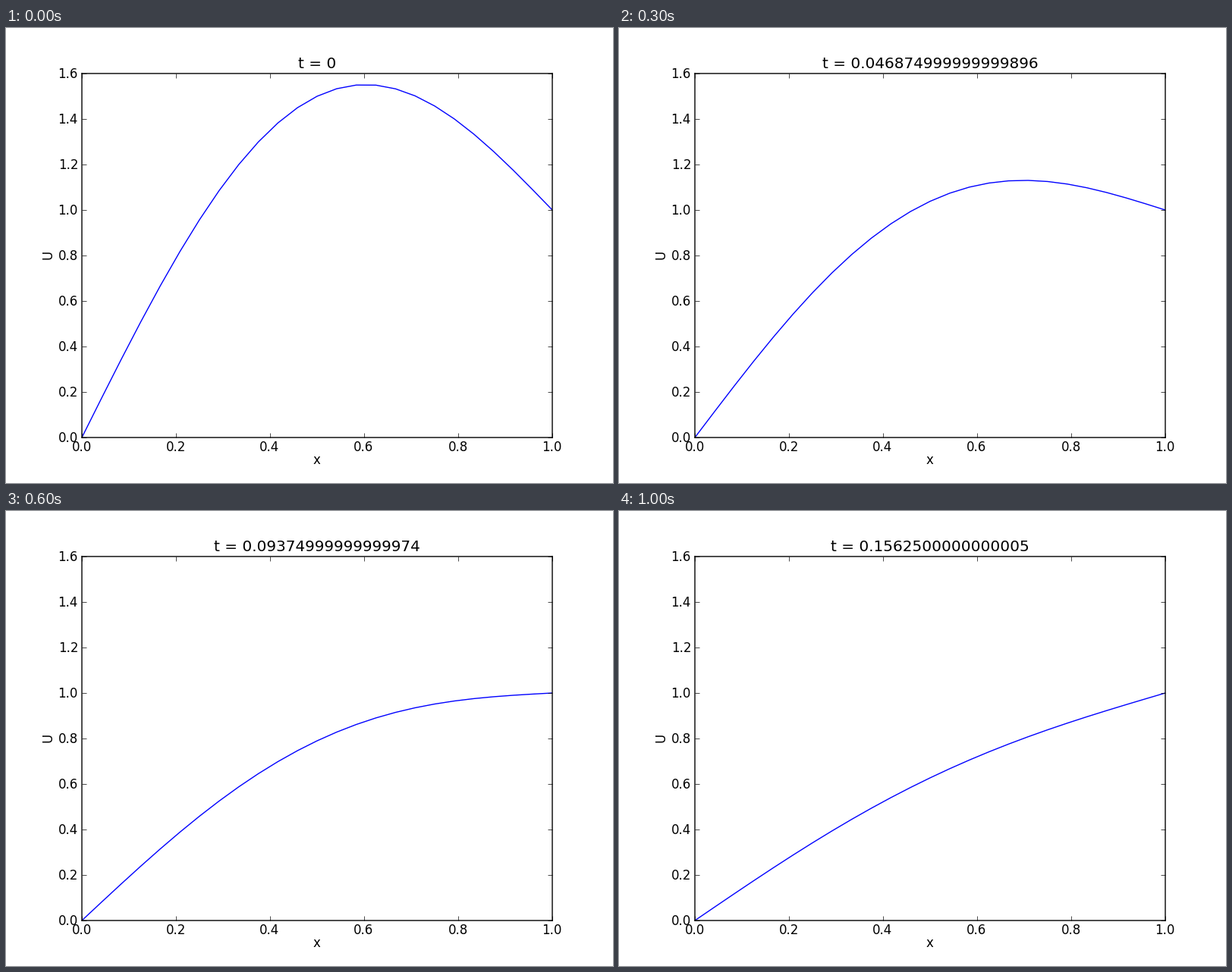
A matplotlib script for the animation above (1100 ms loop, 800x600 px).

```python
import matplotlib.pyplot as plt
import numpy as np
from matplotlib.animation import FuncAnimation
from matplotlib.textpath import TextPath

W, H, DPI = 800, 600, 100
FONT = 12
CELLS = 24
FRAMES = 11
STEPS = 36  # time steps per frame, 36 * dt = 1/64

# Accumulated clock values, rounding drift included
TIMES = (
    "0", "0.015625000000000003", "0.03124999999999995",
    "0.046874999999999896", "0.06249999999999984", "0.07812499999999979",
    "0.09374999999999974", "0.10937499999999968", "0.12499999999999963",
    "0.14062500000000006", "0.1562500000000005",
)

plt.style.use("classic")
plt.rcParams.update({"font.family": "DejaVu Sans", "font.size": FONT})


def solve(x):
    """Explicit diffusion steps with fixed ends, one row per frame."""
    ratio = 0.25 * (1.203 + 0.27 * x[1:-1])
    u = x + np.sin(np.pi * x)
    rows = [u.copy()]
    for _ in range(FRAMES - 1):
        for _ in range(STEPS):
            u[1:-1] += ratio * (u[2:] - 2 * u[1:-1] + u[:-2])
        rows.append(u.copy())
    return rows


fig = plt.figure(figsize=(W / DPI, H / DPI), dpi=DPI, facecolor="white")
ax = fig.add_axes([0.125, 0.1, 0.775, 0.8])
ax.set_xlim(0, 1)
ax.set_ylim(0, 1.6)
ax.set_xticks(np.linspace(0, 1, 6))
ax.set_yticks(np.linspace(0, 1.6, 9))
ax.tick_params(labelbottom=False, labelleft=False)
for spine in ax.spines.values():
    spine.set_snap(False)


def put(x, y, text, **style):
    """Text with its baseline at pixel (x, y), y measured from the top."""
    return fig.text(x / W, 1 - y / H, text, va="baseline", **style)


def label(x, y, text, align=0.5):
    """Text aligned by its inked width: 0.5 centres it, 1 ends it at x."""
    ink = TextPath((0, 0), text, size=FONT * DPI / 72).get_extents()
    return put(x - ink.x0 - align * ink.width, y, text, ha="left")


for v in ax.get_xticks():
    label(99.64 + 620 * v, 558, f"{v:.1f}")
for v in ax.get_yticks():
    label(94, 546 - 300 * v, f"{v:.1f}", align=1)
label(409.64, 575, "x")
put(61, 298.5, "U", ha="center", rotation=90, rotation_mode="anchor")
title = put(410, 53, "", ha="center", fontsize=1.2 * FONT)

x = np.linspace(0, 1, CELLS + 1)
rows = solve(x)
(curve,) = ax.plot(x, rows[0], color="b", lw=1)


def update(i):
    curve.set_ydata(rows[i])
    title.set_text(f"t = {TIMES[i]}")
    return curve, title


anim = FuncAnimation(fig, update, frames=FRAMES, interval=100,
                     repeat=True, repeat_delay=0)
plt.show()
```
